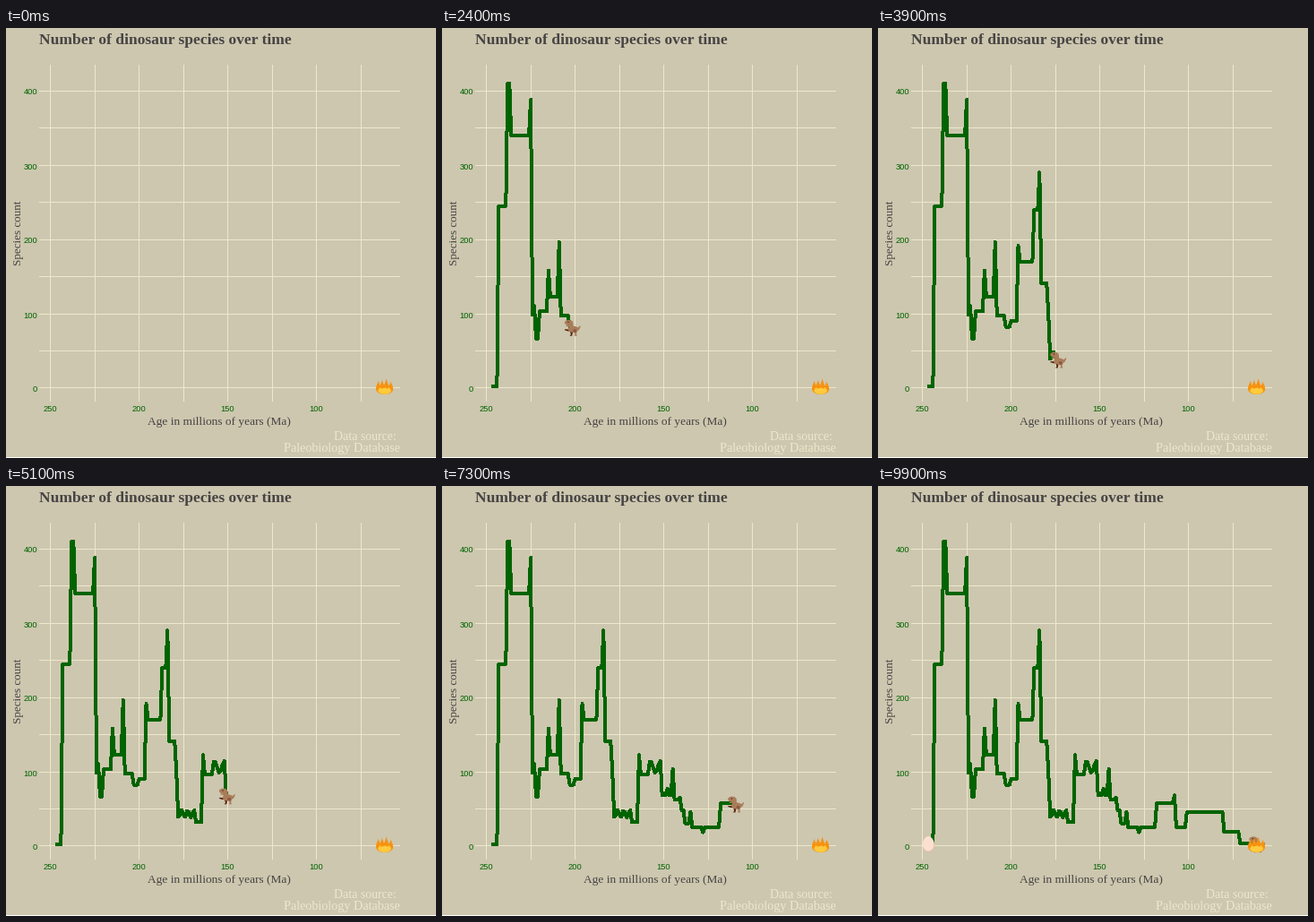
These frames come from a looping animation (480 by 480 pixels, 10000 ms). A matplotlib script:

```python
import math

import matplotlib.pyplot as plt
import numpy as np
from matplotlib.animation import FuncAnimation
from matplotlib.patches import Polygon, Rectangle

SIZE, DPI, FRAMES = 480, 100, 100
PT = 72 / DPI
PAPER, GRID, INK, GREEN = "#CDC7AF", "#EDE7CC", "#474444", "#006400"
START, END = 247, 62

# Plateaus: first age in Ma -> species count, held until the next one
STAGES = {247: 2, 243: 245, 238: 410, 236: 340, 224: 98, 222: 66, 220: 103,
          214: 123, 208: 97, 203: 82, 200: 90, 196: 170, 187: 240, 183: 141,
          178: 43, 168: 32, 163: 96, 158: 106, 151: 68, 144: 62, 140: 48,
          138: 30, 134: 25, 118: 57, 107: 25, 101: 45, 80: 19, 71: 3}
# Single-age spikes
PEAKS = {225: 388, 223: 110, 215: 158, 209: 196, 196: 191, 184: 290, 179: 99,
         164: 122, 148: 77, 145: 103, 141: 65, 135: 45, 128: 18, 108: 68}
# Ripples: from age, to age, crest, period, height
RIPPLES = [(178, 169, 176, 3.4, 5), (158, 152, 157.5, 5.5, 8)]


def species(age):
    level = STAGES[min(a for a in STAGES if a >= age)]
    ripple = sum(h * math.cos(2 * math.pi * (age - crest) / period)
                 for hi, lo, crest, period, h in RIPPLES if lo <= age <= hi)
    return PEAKS.get(age, level + ripple)


def px(age):
    return 49.5 + (250 - age) * 1.982


def py(count):
    return 401.9 - count * 0.8285


ages = np.arange(START, END - 1, -1)
xs, ys = px(ages), py(np.array([species(a) for a in ages]))

fig = plt.figure(figsize=(SIZE / DPI, SIZE / DPI), dpi=DPI, facecolor=PAPER)
ax = fig.add_axes([0, 0, 1, 1])
ax.set(xlim=(0, SIZE), ylim=(SIZE, 0))
ax.axis("off")


def label(x, y, s, size, color=INK, font="Liberation Serif", **kw):
    ax.text(x, y, s, fontsize=size * PT, color=color, family=font, **kw)


def tick(x, y, value, ha):
    label(x, y, str(value), 9.4, GREEN, "Liberation Sans",
          ha=ha, va="center_baseline")


def bar(x, y, w, h, color=GRID):
    ax.add_patch(Rectangle((x, y), w, h, fc=color, ec="none", zorder=1))


for age in range(250, 74, -25):
    x = math.floor(px(age))
    bar(x, 41, 1, 376)
    if age % 50 == 0:
        tick(x, 424.8, age, "center")
for count in range(0, 401, 50):
    y = math.floor(py(count))
    bar(37, y, 403, 1)
    if count % 100 == 0:
        tick(35.3, y + 1, count, "right")
bar(0, SIZE - 1, SIZE, 1, "white")

label(37, 18, "Number of dinosaur species over time", 17.5, weight="bold")
label(238, 443.5, "Age in millions of years (Ma)", 13.4, ha="center")
label(20.3, 229, "Species count", 13.1, rotation=90, ha="right", va="center")
label(365.5, 460, "Data source:", 13.9, GRID)
label(440, 473, "Paleobiology Database", 14.1, GRID, ha="right")


def oval(cx, cy, rx, ry, tip=0.0):
    """Ellipse outline; tip narrows the upper half, 1 gives a flame tongue."""
    t = np.linspace(0, 2 * np.pi, 40)
    return np.c_[cx + rx * np.cos(t) * (1 + tip * np.sin(t)), cy + ry * np.sin(t)]


class Sprite:
    def __init__(self, parts, zorder):
        self.shapes = [np.array(p, float) for p, _ in parts]
        self.patches = [ax.add_patch(Polygon(s, fc=c, ec="none", zorder=zorder))
                        for s, (_, c) in zip(self.shapes, parts)]

    def move(self, x, y):
        for patch, shape in zip(self.patches, self.shapes):
            patch.set_xy(shape + (x, y))

    def show(self, on):
        for patch in self.patches:
            patch.set_visible(on)


BROWN, DARK, CLAW = "#A97C5A", "#8A5A40", "#55200F"
dino = Sprite([
    ([(-3, 1.6), (-8.6, 1.4), (-8.4, 2.6), (-4, 3.8)], CLAW),
    ([(-3, 3), (0.6, 4), (-0.4, 8.8), (-3, 8.8), (-1.6, 7)], CLAW),
    ([(3, -1), (7, -0.8), (8.6, -2.8), (9.2, -1.6), (7.6, 2), (4, 4)], BROWN),
    (oval(0.8, 1.4, 5.6, 3.6), BROWN),
    (oval(-1.6, -3, 2.6, 4.6), BROWN),
    (oval(-4, -6, 4.7, 2.9), BROWN),
    (oval(-4.8, -2.4, 2.6, 0.8), BROWN),
    ([(1, 3), (5.6, 3), (4.4, 6.6), (5.4, 8.8), (2.2, 8.8), (3, 6.8)], BROWN),
    (oval(2.6, 3.2, 2, 1.8), DARK),
    (oval(-4.6, -6.6, 0.7, 0.7), CLAW),
], 5)

egg = Sprite([
    (oval(0.4, 0.6, 6.3, 8.3, 0.1), "#E9BFAB"),
    (oval(-0.1, -0.2, 6.2, 8.2, 0.1), "#FCDFD0"),
], 4)

ORANGE, YELLOW = "#F7920F", "#FFCB3D"
fire = Sprite(
    [(oval(0, 3.6, 9.3, 5.4), ORANGE)]
    + [(oval(x, (top + 5) / 2, 2, (5 - top) / 2, 1), ORANGE)
       for x, top in ((-7, -6.4), (-2.8, -7.6), (2, -9.2), (6.9, -5.6))]
    + [(oval(0, 5.4, 6.6, 3.4), YELLOW)]
    + [(oval(x, 3.6, 1.8, 3, 1), YELLOW) for x in (-5, 0.6, 5)], 6)

egg.move(56.3, 399.4)
fire.move(422.6, 400)
trail, = ax.plot([], [], color=GREEN, lw=3 * PT, antialiased=False,
                 solid_capstyle="butt", solid_joinstyle="round", zorder=3)


def update(i):
    step = math.ceil((START - END) * i / (FRAMES - 1))
    trail.set_data(xs[:step + 1], ys[:step + 1] - 0.4)
    trail.set_visible(i > 0)
    dino.move(xs[step] + 0.9, ys[step] + 0.9)
    dino.show(i > 0)
    egg.show(i == FRAMES - 1)
    return [trail, *dino.patches, *egg.patches]


anim = FuncAnimation(fig, update, frames=FRAMES, interval=100, repeat=True,
                     repeat_delay=0)
plt.show()
```
